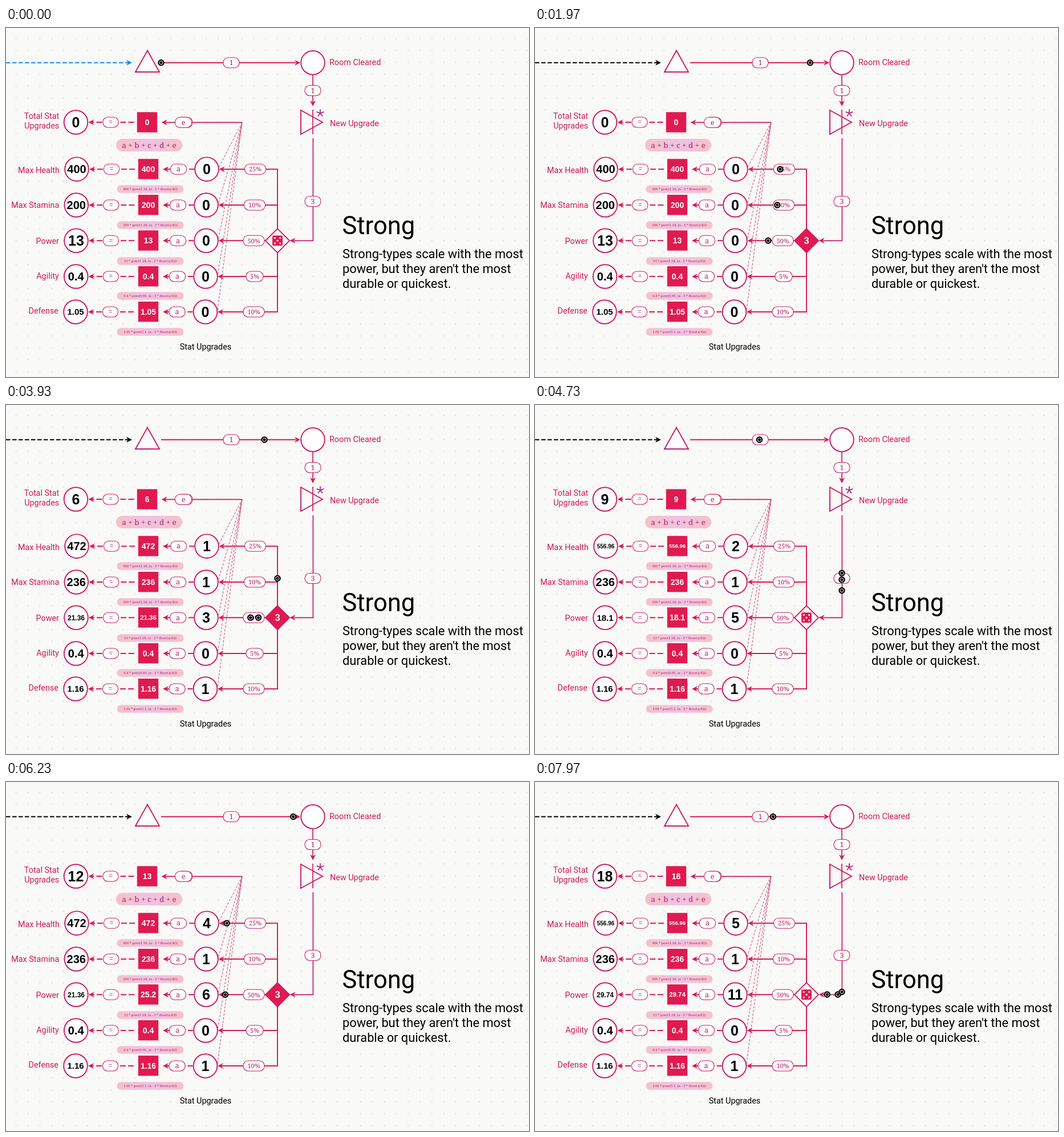
An HTML page for the animation above (8000 ms loop, 917 px wide and 611 px high).

```html
<!DOCTYPE html>
<html lang="en">
<head>
<meta charset="utf-8">
<title>Stat Upgrades</title>
<style>
html, body { margin: 0; width: 100%; height: 100%; overflow: hidden; background: #f9f9f7; }
svg { display: block; width: 100vw; height: 100vh; }
.label { font: 14.4px Roboto, sans-serif; fill: #cf1a56; }
.black { fill: #000; }
.num { font-family: "Liberation Sans", Arial, sans-serif; font-weight: 700; text-anchor: middle; }
.serif { font-family: "Noto Serif", serif; text-anchor: middle; fill: #b3205c; }
.line { fill: none; stroke: #d81b55; stroke-width: 1.9; }
.thin { stroke: #c91a64; stroke-width: 1.7; }
.fan { fill: none; stroke: #c4306c; stroke-width: .9; stroke-dasharray: 4 2.5; }
.node { fill: #fff; stroke: url(#edge); stroke-width: 1.9; }
.pill { fill: #fff; stroke: url(#edge); stroke-width: 1.1; }
</style>
</head>
<body>
<svg id="stage" viewBox="0 0 917 611" preserveAspectRatio="none">
  <defs>
    <linearGradient id="edge" x1="0" y1="1" x2="1" y2="0">
      <stop offset="0" stop-color="#a81c84"/><stop offset=".45" stop-color="#e01a50"/><stop offset="1" stop-color="#c21a68"/>
    </linearGradient>
    <linearGradient id="soft">
      <stop offset="0" stop-color="#f5c1ca"/><stop offset=".5" stop-color="#efc2e2"/><stop offset="1" stop-color="#f5c1ca"/>
    </linearGradient>
    <pattern id="dots" x="465.6" y="237.1" width="20.83" height="20.83" patternUnits="userSpaceOnUse">
      <circle cx="10.4" cy="10.4" r=".9" fill="#cfcde0"/>
    </pattern>
  </defs>
  <rect width="917" height="611" fill="#f9f9f7"/>
  <rect width="917" height="611" fill="url(#dots)"/>
</svg>
<script>
const LOOP = 8000, HOP = 304, TOP_TIME = 1028;
const FEED_AT = 332, SPLIT_AT = 669;
const FEED_LAG = [0, 26, 42], SPLIT_LAG = [0, 27, 51];
const STEPS = [30, 1081, 2113, 3165, 4217, 5251, 6303, 7356];
// Rows hit by the three tokens of each step
const WAVES = [[], [0, 1, 2], [2, 4, 2], [2, 0, 2], [0, 2, 0], [2, 0, 2], [2, 2, 2], [2, 0, 2]];
const CRIMSON = '#e01a50';

const stage = document.getElementById('stage');
function add(tag, attrs, text, parent = stage) {
  const el = document.createElementNS('http://www.w3.org/2000/svg', tag);
  for (const key in attrs) el.setAttribute(key, attrs[key]);
  if (text !== undefined) el.textContent = text;
  parent.appendChild(el);
  return el;
}
const poly = (pts, attrs) => add('polyline', { class: 'line', points: pts.join(' '), ...attrs });
const label = (x, y, text, attrs) => add('text', { class: 'label', x, y, ...attrs }, text);

function head(x, y, turn = 0, attrs, parent) {
  return add('path', {
    d: 'M0 0L-10 -5L-7 0L-10 5Z', fill: '#d81b55',
    transform: `translate(${x} ${y}) rotate(${turn})`, ...attrs
  }, undefined, parent);
}
function pill(x, y, text, w = 28) {
  add('rect', { class: 'pill', x: x - w / 2, y: y - 9, width: w, height: 18, rx: 8.5 });
  add('text', { class: 'serif', x, y: y + 4.2, 'font-size': text.length > 1 ? 11 : 12.5 }, text);
}
function formula(x, y, w, h, size, text) {
  add('rect', { x: x - w / 2, y: y - h / 2, width: w, height: h, rx: h / 2, fill: 'url(#soft)' });
  add('text', { class: 'serif', x, y: y + size * .34, 'font-size': size }, text);
}
function numberIn(x, y, big, wide, fill) {
  const el = add('text', { class: 'num', x, fill });
  return value => {
    const text = String(value), size = Math.min(big, wide / text.length);
    el.textContent = text;
    el.setAttribute('font-size', size);
    el.setAttribute('y', y + size * .36);
  };
}
function circle(x, y) {
  add('circle', { class: 'node', cx: x, cy: y, r: 20.8 });
  return numberIn(x, y, 25, 60, '#000');
}
function square(x, y) {
  add('rect', { x: x - 17.7, y: y - 17.7, width: 35.4, height: 35.4, fill: CRIMSON });
  return numberIn(x, y, 14, 57, '#fff');
}
function stateLink(x, y) {
  poly([[x + 102, y], [x + 29, y]], { 'stroke-dasharray': '10 4' });
  head(x + 22, y, 180);
  pill(x + 61, y, '=', 27);
}

// Top track
const glow = add('g', {});
add('path', { d: 'M0 60.8H214', stroke: '#f79410', 'stroke-width': 6 }, undefined, glow);
head(222, 60.8, 0, { fill: '#f79410', stroke: '#f79410', 'stroke-width': 4 }, glow);
const dash = add('path', { d: 'M0 60.8H214', 'stroke-width': 2, 'stroke-dasharray': '7.5 3.5' });
const dashHead = head(221, 60.8);

const topPath = [[272, 60.8], [515, 60.8]];
const downPath = [[538, 82], [538, 138]];
const feedPath = [[538, 193], [538, 372], [497, 372]];
poly([[272, 60.8], [508, 60.8]]);
head(516, 60.8);
pill(395, 60.8, '1');
add('path', { class: 'node', d: 'M248 39.5L269 77H227Z' });
add('circle', { class: 'node', cx: 538, cy: 60.8, r: 20.8 });
label(567, 65.3, 'Room Cleared');

poly([[538, 82], [538, 130]], { class: 'line thin' });
head(538, 137, 90);
pill(538, 109.5, '1');
add('path', { class: 'node', d: 'M517 144L555 165L517 186Z', style: 'fill:none' });
poly([[538, 143], [538, 186]], { class: 'line thin' });
const arms = [-90, -18, 54, 126, 198].map(a => {
  const r = a * Math.PI / 180;
  return `M551 149L${551 + 6.8 * Math.cos(r)} ${149 + 6.8 * Math.sin(r)}`;
});
add('path', { d: arms.join(''), stroke: '#b51b80', 'stroke-width': 1.7 });
label(568, 171.8, 'New Upgrade');
poly([[538.4, 193], [538.4, 372.3], [505, 372.3]], { class: 'line thin' });
head(497.5, 372.3, 180);
pill(538, 303.5, '3');

// Total row
poly([[414, 165.3], [280, 165.3]], { class: 'line thin' });
head(272.5, 165.3, 180);
pill(312.5, 165.3, '', 29);
pill(311, 165.3, 'e', 29);
stateLink(122.5, 165);
const total = { pool: circle(122.5, 165), calc: square(247.5, 165) };
label(93.3, 159, 'Total Stat', { 'text-anchor': 'end' });
label(93.3, 175.7, 'Upgrades', { 'text-anchor': 'end' });
formula(251, 205, 116, 22, 13.4, 'a + b + c + d + e');

// Stat rows: name, base, growth, row y, left circle x, count x, odds, odds x, formula y, label y
const rows = [
  ['Max Health', 400, 1.18, 247.2, 124, 352, '25%', 437, 282, 254],
  ['Max Stamina', 200, 1.18, 310, 123.3, 351, '10%', 436, 345, 315],
  ['Power', 13, 1.18, 372.3, 123, 351, '50%', 434.5, 408, 378],
  ['Agility', .4, .95, 435, 122.7, 350, '5%', 436, 469, 439],
  ['Defense', 1.05, 1.1, 497, 122, 349.5, '10%', 434.5, 532, 500]
].map(([name, base, growth, y, x, countX, odds, oddsX, fy, ly]) => {
  const tip = countX + 21.5;
  const start = y < 372 ? 351 : 393;
  const path = name === 'Power' ? [[455, y], [tip, y]] : [[476, start], [476, y], [tip, y]];
  poly([...path.slice(0, -1), [tip + 7, y]]);
  head(tip, y, 180);
  pill(oddsX, y, odds, odds.length > 2 ? 37 : 30);
  stateLink(x, y);
  poly([[countX - 22, y], [282, y]], { 'stroke-dasharray': '9 4' });
  head(275, y, 180);
  pill(countX - 49.5, y, 'a');
  poly([[tip, y - 4], [414, 165.3]], { class: 'fan' });
  formula(253, fy, 117, 13.5, 6, `${base} * pow(${growth}, (a - 3 * floor(a/4)))`);
  label(x - 30, ly, name, { 'text-anchor': 'end' });
  return {
    base, growth, path,
    pool: circle(x, y), calc: square(249.5, y - .3), count: circle(countX, y)
  };
});

// Random gate
const gate = add('path', { class: 'node', d: 'M476 351.3L497 372.3L476 393.3L455 372.3Z' });
const dice = add('g', {});
add('rect', { x: 467, y: 363.3, width: 18, height: 18, rx: 3, fill: CRIMSON }, undefined, dice);
for (const [dx, dy] of [[0, 0], [-4.7, -4.7], [4.7, -4.7], [-4.7, 4.7], [4.7, 4.7]])
  add('circle', { cx: 476 + dx, cy: 372.3 + dy, r: 1.6, fill: '#fff' }, undefined, dice);
const gateText = add('text', { class: 'num', x: 476, y: 378.3, 'font-size': 16.5, fill: '#fff' }, '3');

label(350, 562.8, 'Stat Upgrades', { class: 'label black', 'text-anchor': 'middle' });
label(589.5, 361.3, 'Strong', { class: 'label black', style: 'font-size:43.5px' });
['Strong-types scale with the most', "power, but they aren't the most", 'durable or quickest.'].forEach((text, i) =>
  label(590, 402.7 + i * 26.3, text, { class: 'label black', style: 'font-size:21.8px' }));

const tokens = Array.from({ length: 5 }, () => {
  const g = add('g', {});
  add('circle', { r: 5.7 }, undefined, g);
  add('circle', { r: 3.1, fill: 'none', stroke: '#fff', 'stroke-width': 1 }, undefined, g);
  return g;
});

function along(path, p) {
  const legs = path.slice(1).map((b, i) => Math.hypot(b[0] - path[i][0], b[1] - path[i][1]));
  let left = p * legs.reduce((a, b) => a + b);
  let i = 0;
  while (i < legs.length - 1 && left > legs[i]) left -= legs[i++];
  const f = left / legs[i], [a, b] = [path[i], path[i + 1]];
  return [a[0] + (b[0] - a[0]) * f, a[1] + (b[1] - a[1]) * f];
}
const show = (el, on) => { el.style.display = on ? '' : 'none'; };
function place(token, path, p) {
  const on = p >= 0 && p < 1;
  show(token, on);
  if (on) token.setAttribute('transform', `translate(${along(path, p)})`);
}
const round = v => Math.round(v * 100) / 100;
const sum = list => list.reduce((a, b) => a + b);

// Upgrades received per row by time t
function tally(t) {
  const counts = [0, 0, 0, 0, 0];
  WAVES.forEach((wave, k) => wave.forEach((row, i) => {
    if (t >= STEPS[k] + SPLIT_AT + HOP + SPLIT_LAG[i]) counts[row]++;
  }));
  return counts;
}

function draw(t) {
  let k = STEPS.length - 1;
  while (k > 0 && t < STEPS[k]) k--;
  const phase = t - STEPS[k];
  const moving = k > 0;

  const color = t < STEPS[0] ? '#1a86f5' : '#000';
  show(glow, phase >= 0 && phase < 300);
  dash.setAttribute('stroke', color);
  dashHead.setAttribute('fill', color);

  place(tokens[0], topPath, Math.max(0, phase / TOP_TIME));
  place(tokens[1], downPath, moving ? (phase - 35) / HOP : -1);
  for (let i = 0; i < 3; i++) {
    const fed = phase - FEED_AT - FEED_LAG[i];
    const split = phase - SPLIT_AT - SPLIT_LAG[i];
    const out = split >= 0;
    const path = moving && out ? rows[WAVES[k][i]].path : feedPath;
    place(tokens[2 + i], path, moving ? (out ? split : fed) / HOP : -1);
  }

  const full = moving && phase >= 650;
  gate.style.fill = full ? CRIMSON : '#fff';
  show(dice, !full);
  show(gateText, full);

  // Circles show a new value just after the squares
  const now = tally(t), shown = tally(t - 10);
  rows.forEach((row, i) => {
    const stat = a => round(row.base * row.growth ** (a - 3 * Math.floor(a / 4)));
    row.count(shown[i]);
    row.calc(stat(now[i]));
    row.pool(stat(shown[i]));
  });
  total.calc(sum(now));
  total.pool(sum(shown));
}

function tick() {
  draw(performance.now() % LOOP);
  requestAnimationFrame(tick);
}
tick();
</script>
</body>
</html>
```
